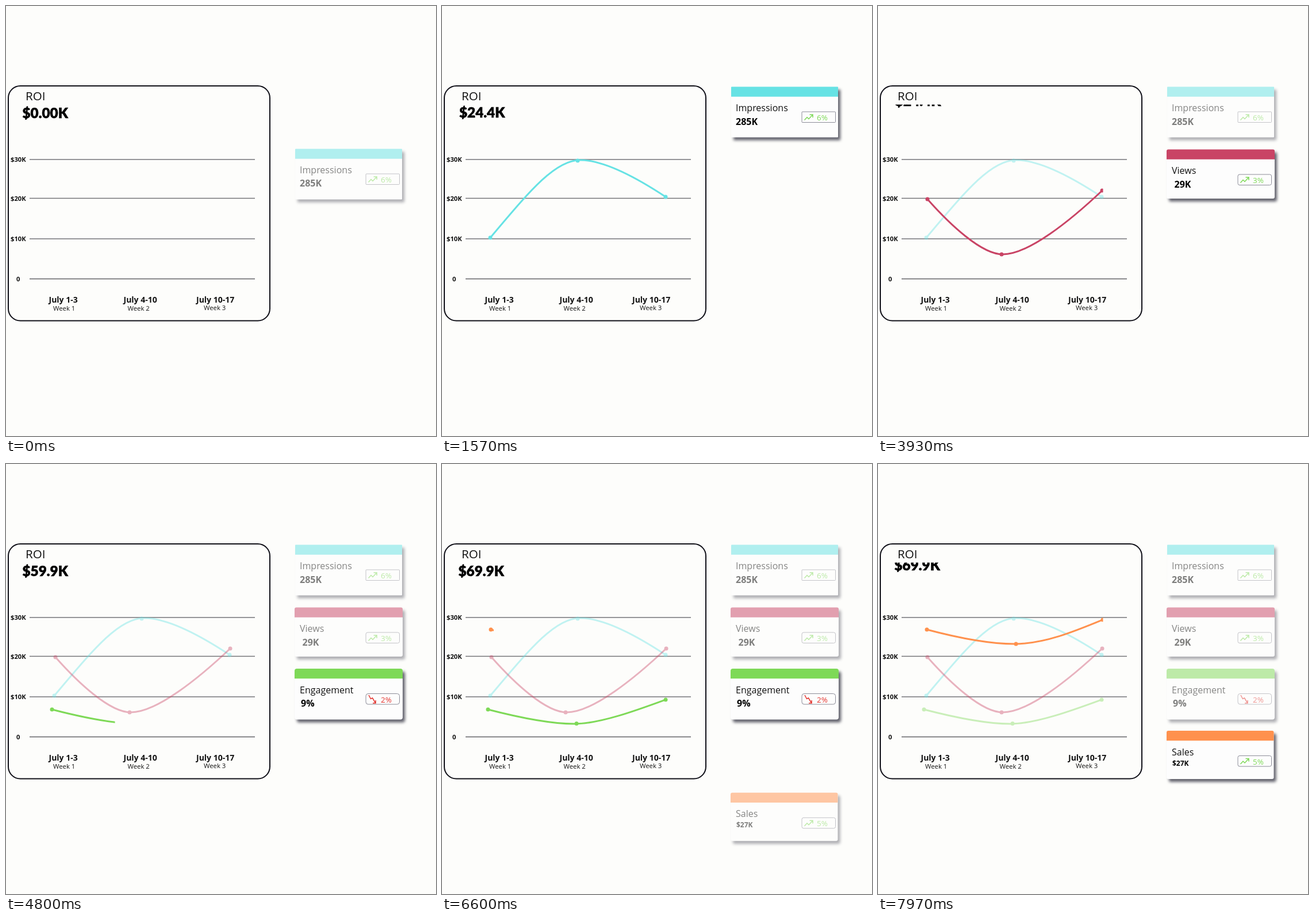
Animation of 748x748 px, one loop 8000 ms. Source, as an HTML page:

```html
<!DOCTYPE html>
<html lang="en">
<head>
<meta charset="utf-8">
<title>ROI dashboard</title>
<style>
  html, body { margin: 0; width: 100%; height: 100%; overflow: hidden; background: #fdfdfb; }
  svg { display: block; width: 100vw; height: 100vh; font-family: "Open Sans", "Noto Sans", sans-serif; fill: #111; }
  .grid { stroke: #747478; stroke-width: 1.7; }
  .axis { font-size: 11.2px; font-weight: 700; }
  .date { font-size: 14px; font-weight: 700; }
  .week { font-size: 11.3px; }
  .total { font: 900 24.3px Lato, sans-serif; fill: #000; stroke: #000; stroke-width: .5; }
  .name { font-size: 16px; }
  .value { font-size: 16px; font-weight: 700; fill: #000; }
  .percent { font-size: 13.5px; stroke: none; }
  .curve { fill: none; stroke-width: 3; }
  .shadow { filter: drop-shadow(4px 5px 2.5px rgba(45, 45, 60, .75)); }
</style>
</head>
<body>
<svg viewBox="0 0 748 748">
  <defs><clipPath id="totalClip"><rect x="20" y="171.5" width="120" height="28"/></clipPath></defs>
  <rect x="4" y="139" width="455" height="408.5" rx="21" fill="#fdfdfb" stroke="#101018" stroke-width="2"/>
  <text x="34" y="164" font-size="20.5">ROI</text>
  <g id="totals" clip-path="url(#totalClip)"></g>
  <g id="axes"></g>
  <g id="lines"></g>
  <g id="cards"></g>
</svg>
<script>
const LOOP = 8000;
const UP = '#7ed957', DOWN = '#e3342f';
const $ = id => document.getElementById(id);

// start: card begins to rise; draw: line begins to appear
const series = [
  { start: 0, draw: 25, color: '#66e2e4', name: 'Impressions', value: '285K', percent: '6%',
    x: 503, right: 689, top: 140.5, bottom: 228.5, radius: 1, valueX: 511, valueY: 66,
    path: 'M84 403C150 325 196 268 240 268C285 268 345 303 389 332', dots: [[84, 403], [236, 269], [389, 332]] },
  { start: 1875, draw: 1835, color: '#c94465', name: 'Views', value: '29K', percent: '3%',
    x: 502, right: 690, top: 249.5, bottom: 335, radius: 3, valueX: 515.5, valueY: 66,
    path: 'M86 336C125 380 180 432 217 432C262 432 335 373 390 321', dots: [[86, 336], [215, 432], [390, 321]] },
  { start: 4325, draw: 4285, color: '#7ed957', name: 'Engagement', value: '9%', percent: '2%', down: true,
    x: 502, right: 690, top: 356, bottom: 444.5, radius: 4, valueX: 513, valueY: 66,
    path: 'M80 427C130 440 190 452 230 452C275 452 340 428 389 410', dots: [[80, 427], [234, 451.5], [389, 410]] },
  { start: 6590, draw: 6560, color: '#ff914d', name: 'Sales', value: '$27K', percent: '5%',
    x: 502, right: 688.5, top: 464, bottom: 548, radius: 3, valueX: 512, valueY: 60.5, valueSize: 12,
    path: 'M85 288C130 300 190 313 238 313C290 313 345 290 391 271', dots: [[85, 288], [240, 313], [391, 271]] }
];

// Each total slides out at "out"; the next one then slides in
const totals = [
  { text: '$0.00K', x: 28.5, y: 195, out: 900 },
  { text: '$24.4K', x: 30, y: 194, out: 3740 },
  { text: '$59.9K', x: 28.5, y: 195, out: 5850 },
  { text: '$69.9K', x: 28.5, y: 195, out: 7850 }
];

const text = (cls, x, y, s, extra = '') => `<text class="${cls}" x="${x}" y="${y}" ${extra}>${s}</text>`;

function axesMarkup() {
  const rows = [['$30K', 8, 267], ['$20K', 8, 334.5], ['$10K', 8, 405], ['0', 18, 474.7]];
  const weeks = [['July 1-3', 74.5, 82], ['July 4-10', 204.5, 211.5], ['July 10-17', 331, 344]];
  return rows.map(([s, x, y]) =>
      `<path class="grid" d="M41 ${y}H433"/>` + text('axis', x, y + 4.3, s)).join('') +
    weeks.map(([date, x, weekX], i) =>
      text('date', x, 516, date) + text('week', weekX, i === 2 ? 529 : 530, 'Week ' + (i + 1))).join('');
}

function lineMarkup(s, i) {
  const dots = s.dots.map(([x, y]) => `<circle cx="${x}" cy="${y}" r="3.5"/>`).join('');
  return `<clipPath id="wipe${i}"><rect id="wipeRect${i}" x="0" y="200" width="0" height="300"/></clipPath>
    <g id="line${i}" clip-path="url(#wipe${i})" fill="${s.color}">
    <path class="curve" d="${s.path}" stroke="${s.color}"/>${dots}</g>`;
}

function badgeMarkup(s) {
  const color = s.down ? DOWN : UP;
  const arrow = s.down
    ? 'M5 2.5L8.5 9L11.5 7.5L16.5 16M12 16.5H17V11.5'
    : 'M4.5 14.5L9 9.5L12 12.5L18.5 5.5M13.5 5H19V10';
  return `<g transform="translate(626 ${s.top + 43.5})">
    <rect width="58.5" height="18.5" rx="${s.radius}" fill="none" stroke="#8c8c98"/>
    <path d="${arrow}" fill="none" stroke="${color}" stroke-width="1.5"/>
    ${text('percent', 26, 15, s.percent, `fill="${color}"`)}</g>`;
}

function cardMarkup(s, i) {
  const { x, right, top, bottom, radius: r } = s;
  const width = right - x;
  return `<g id="card${i}">
    <rect class="shadow" x="${x}" y="${top}" width="${width}" height="${bottom - top}" rx="${r}" fill="#fdfdfd"/>
    <path fill="${s.color}" d="M${x} ${top + 17.3}v${r - 17.3}q0 ${-r} ${r} ${-r}h${width - 2 * r}q${r} 0 ${r} ${r}v${17.3 - r}z"/>
    ${text('name', 511, top + 42.7, s.name)}
    ${text('value', s.valueX, top + s.valueY, s.value, s.valueSize ? `style="font-size:${s.valueSize}px"` : '')}
    ${badgeMarkup(s)}</g>`;
}

$('axes').innerHTML = axesMarkup();
$('lines').innerHTML = series.map(lineMarkup).join('');
$('cards').innerHTML = series.map(cardMarkup).join('');
$('totals').innerHTML = totals.map((v, i) => text('total', v.x, v.y, v.text, `id="total${i}"`)).join('');

const progress = (t, from, length) => Math.min(1, Math.max(0, (t - from) / length));
const ease = p => p * p * (3 - 2 * p);
const eased = (t, from, length) => ease(progress(t, from, length));

function render(t) {
  series.forEach((s, i) => {
    const next = series[i + 1];
    const rise = eased(t, s.start, 400);
    const dim = next ? eased(t, next.start, 400) : 0;
    const appear = i ? progress(t, s.start - 150, 150) : 1;
    $('card' + i).setAttribute('transform', `translate(0 ${108 * (1 - rise)})`);
    $('card' + i).setAttribute('opacity', .5 * appear + .5 * rise - .5 * dim);

    // The wipe stops just inside the last dot until the next series takes over
    const left = s.dots[0][0] - 4;
    const limit = i === 0 || dim > 0 ? 400 : 391.5;
    const edge = Math.min(limit, left + (t - s.draw) * .22);
    $('wipeRect' + i).setAttribute('width', t < s.draw ? 0 : dim > 0 ? limit : edge);
    $('line' + i).setAttribute('opacity', 1 - .6 * dim);
  });

  totals.forEach((v, i) => {
    const enter = i ? eased(t, totals[i - 1].out + 300, 300) : 1;
    const leave = eased(t, v.out, 300);
    $('total' + i).setAttribute('transform', `translate(0 ${28 * (1 - enter - leave)})`);
  });
}

function tick() {
  render(performance.now() % LOOP);
  requestAnimationFrame(tick);
}
tick();
</script>
</body>
</html>
```
